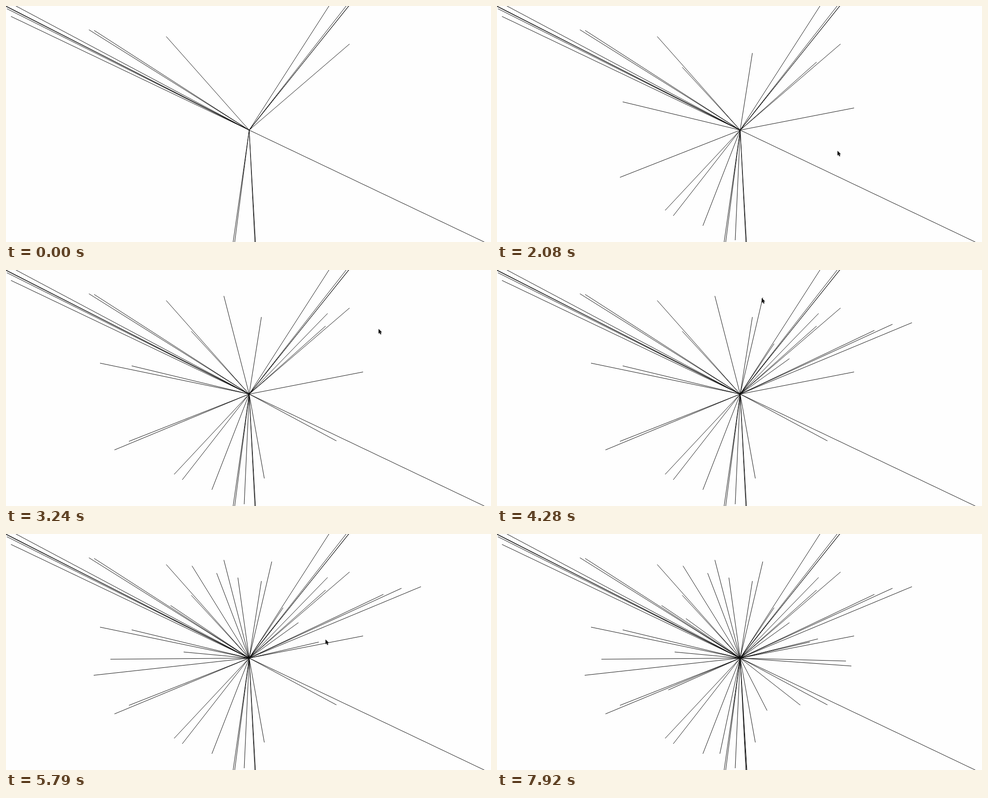
An HTML page with a canvas that plays this animation: 1073 px wide and 522 px high, repeating every 8.02 s.

```html
<!DOCTYPE html>
<html>
<head>
<meta charset="utf-8">
<title>Radial lines</title>
<style>
html, body { margin: 0; width: 100%; height: 100%; overflow: hidden; background: #fefefe; }
canvas { display: block; }
</style>
</head>
<body>
<canvas id="stage" width="1073" height="522"></canvas>
<script>
const ctx = document.getElementById('stage').getContext('2d');
const LOOP = 8020, STEP = 95.3, LEAD = 65;  // the picture advances in steps
const FIRST = 3.25, EVERY = 1.94;           // steps until the first line, and between lines
const CX = 538, CY = 274.5;

// Lines present from the start
const base = [
  [22, 0], [0, 0], [0, 1], [2, 6], [11, 23], [183.5, 52.5], [195, 54],
  [354.5, 67.5], [714.5, 0], [752.5, 0], [758, 0], [758.6, 0], [760, 84],
  [1058, 522], [502.5, 522], [506, 522], [550.5, 522], [552, 522]
];

// Mouse stops, evenly spaced in time; each one leaves a line
const stops = [
  [527, 518], [455.5, 486], [390, 464], [372, 452], [272, 379], [278, 212],
  [410, 135.5], [565, 104], [707, 124], [790, 225.5], [731, 378], [571.5, 461],
  [240, 398], [208, 206], [482, 57.5], [711.5, 96], [835, 133.5], [875, 120],
  [918, 116.5], [647, 196], [613, 163], [588, 61], [513, 96.5], [466, 86.5],
  [411.5, 70.5], [364, 158], [393, 261], [231, 277], [194, 312.5], [692, 239],
  [710, 232], [772, 281], [784, 292], [671, 378.5], [597.5, 390.5], [379, 345],
  [418, 187], [493, 486], [553, 523]
];

// The mouse darts to the next stop, then slows down
function mouseAt(p) {
  const i = Math.floor(p), a = stops[i], b = stops[i + 1];
  const e = 1 - (1 - p + i) ** 6;
  return a.map((v, n) => v + (b[n] - v) * e);
}

function ray([x, y]) {
  ctx.beginPath();
  ctx.moveTo(CX, CY);
  ctx.lineTo(x, y);
  ctx.stroke();
}

const arrow = new Path2D('M0 0V10.2L2.3 8.2L4 12L6 11.1L4.3 7.4H7.4Z');

function pointer([x, y]) {
  ctx.save();
  ctx.translate(x, y);
  ctx.shadowColor = 'rgba(0,0,0,.4)';
  ctx.shadowBlur = 2;
  ctx.shadowOffsetY = 1;
  ctx.fillStyle = '#111';
  ctx.fill(arrow);
  ctx.restore();
}

function draw() {
  const step = Math.floor((performance.now() % LOOP - LEAD) / STEP);
  const p = (step - FIRST) / EVERY;
  ctx.fillStyle = '#fefefe';
  ctx.fillRect(0, 0, 1073, 522);
  ctx.strokeStyle = '#0a0a0a';
  base.forEach(ray);
  stops.slice(0, Math.max(0, Math.floor(p) + 1)).forEach(ray);
  if (p >= 0 && p < stops.length - 1) pointer(mouseAt(p));
  requestAnimationFrame(draw);
}
draw();
</script>
</body>
</html>
```
